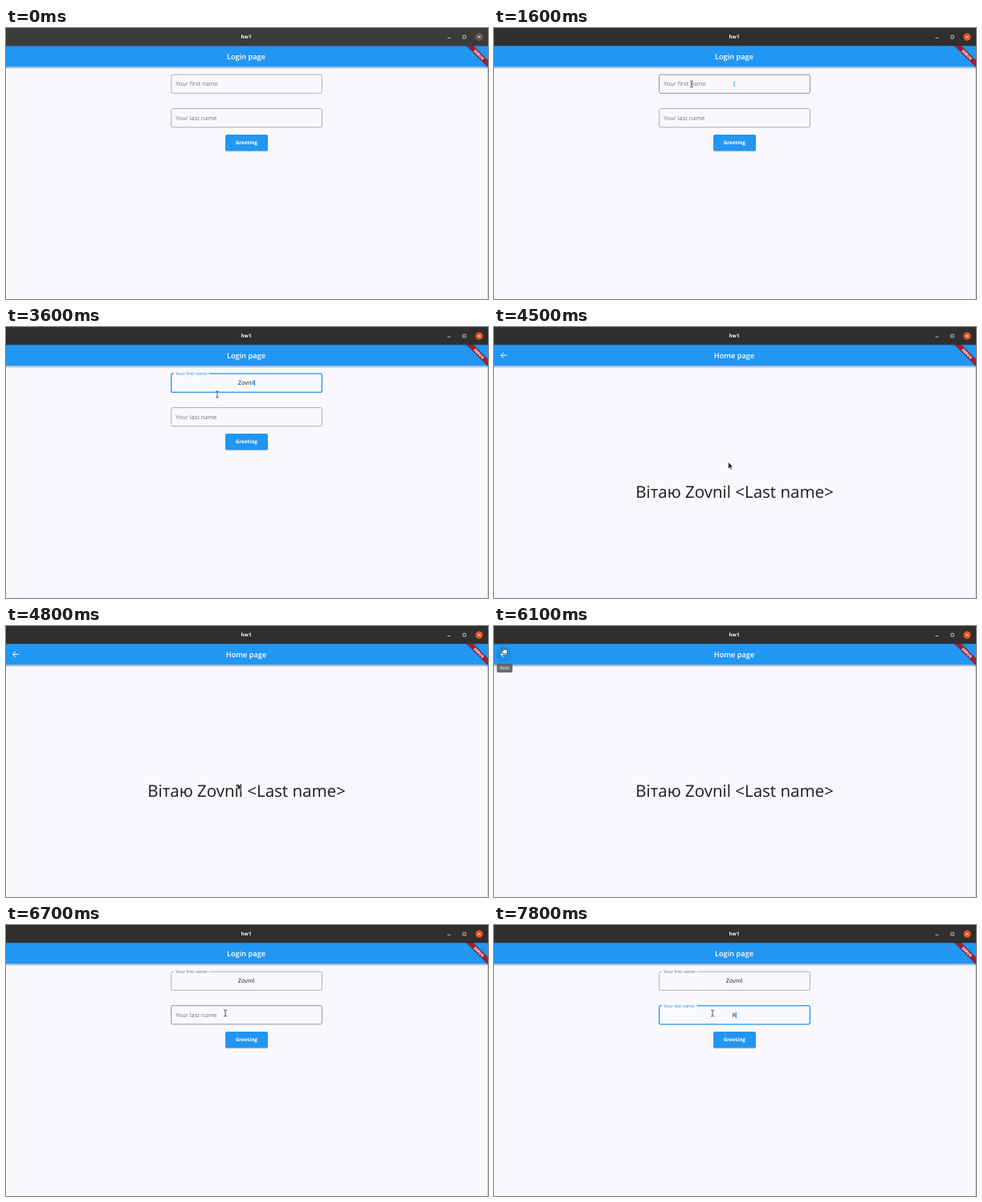
Write an HTML page that moves like this. It is 600 px wide and 338 px high and loops after 8 s.

```html
<!DOCTYPE html>
<html lang="en">
<head>
<meta charset="utf-8">
<title>Login page</title>
<style>
  html, body { margin: 0; width: 100%; height: 100%; overflow: hidden; background: #faf8fc; }
  svg { display: block; width: 600px; height: 338px; }
  text { font-family: "Open Sans", "Noto Sans", sans-serif; text-rendering: geometricPrecision; white-space: pre; }
  .mid { text-anchor: middle; }
  .bar { font-size: 9.2px; font-weight: 600; fill: #fff; }
  .typed { font-size: 7.4px; fill: #1d1b20; }
</style>
</head>
<body>
<svg viewBox="0 0 600 338">
  <defs>
    <linearGradient id="shade" x2="0" y2="1">
      <stop stop-color="#000" stop-opacity=".3"/>
      <stop offset="1" stop-color="#000" stop-opacity="0"/>
    </linearGradient>
    <clipPath id="app"><rect y="22" width="600" height="316"/></clipPath>
    <g id="page">
      <rect y="22" width="600" height="316" fill="#faf8fc"/>
      <rect y="48.5" width="600" height="3" fill="url(#shade)"/>
      <rect y="22" width="600" height="26.5" fill="#2196f3"/>
    </g>
  </defs>

  <g clip-path="url(#app)">
    <g id="login">
      <use href="#page"/>
      <text class="bar mid" x="299" y="39">Login page</text>
      <g id="fields"></g>
      <rect x="273" y="134" width="53" height="20.3" rx="2" fill="#000" opacity=".2"/>
      <rect x="273" y="133" width="53" height="20.3" rx="2" fill="#2196f3"/>
      <rect id="hover" x="273" y="133" width="53" height="20.3" rx="2" fill="#fff" opacity="0"/>
      <text class="mid" x="299.3" y="145.4" font-size="6.3" font-weight="700" fill="#fff">Greeting</text>
    </g>
    <rect id="scrim" y="22" width="600" height="316"/>
    <g id="home">
      <use href="#page"/>
      <text class="bar mid" x="299" y="39">Home page</text>
      <circle id="halo" cx="12" cy="35.4" r="9.4" fill="#000" opacity=".06"/>
      <path d="M15.6 35.4H8.8M12 32l-3.4 3.4 3.4 3.4" fill="none" stroke="#fff"/>
      <text id="hello" class="mid" x="299.5" y="213" font-size="20.5" fill="#1d1b20"></text>
    </g>
    <g id="tip">
      <rect x="3.5" y="47" width="19.5" height="11" rx="2" fill="#616161" opacity=".92"/>
      <text class="mid" x="13.2" y="54.4" font-size="5.3" fill="#fff">Back</text>
    </g>
    <g transform="translate(600 22) rotate(45)">
      <rect x="-20" y="12.6" width="40" height="7" fill="#000" opacity=".25"/>
      <rect x="-20" y="13.2" width="40" height="5.7" fill="#b0161f" opacity=".92"/>
      <text class="mid" y="17.7" font-size="4.5" font-weight="800" fill="#fff">DEBUG</text>
    </g>
    <path d="M599.7 49V338" stroke="#000" stroke-width=".6" opacity=".35"/>
  </g>

  <rect width="600" height="22.3" fill="#302f2e"/>
  <rect id="dim" width="600" height="22.3" fill="#3d3b3a"/>
  <text class="mid" x="299" y="13.4" font-size="6.2" font-weight="700" fill="#fff">hw1</text>
  <g id="controls" fill="none" stroke="#ddd" stroke-width=".8">
    <path d="M549.5 12.4h4M568.8 9.4h3.4v3.6h-3.4z"/>
    <circle cx="589" cy="11.2" r="4.6" fill="#e95420" stroke="none"/>
    <circle id="grey" cx="589" cy="11.2" r="4.6" fill="#5b5957" stroke="none"/>
    <path d="M587.4 9.6l3.2 3.2m0-3.2l-3.2 3.2" stroke="#fff"/>
  </g>

  <g id="cursor">
    <path id="arrow" d="M0 0v8.6l2-1.8 1.4 3 1.3-.6-1.3-2.9h2.7z" fill="#222" stroke="#fff" stroke-width=".6"/>
    <path id="beam" d="M-2-4q2 0 2 1v6q0 1-2 1M2-4q-2 0-2 1M2 4q-2 0-2-1" fill="none" stroke="#444" stroke-width=".9"/>
    <path id="hand" d="M-.7.6q.7-1.1 1.4 0v3l3 .6q1.2.4 1 1.7l-.6 3.4h-4.4l-2.6-3.6q.2-1.3 1.4-.5l.8.6z" fill="#fff" stroke="#222" stroke-width=".7"/>
  </g>
</svg>
<script>
const $ = id => document.getElementById(id);
const clamp = v => Math.max(0, Math.min(1, v));
const ramp = (t, start, len) => clamp((t - start) / len);
const mix = (a, b, k) => a + (b - a) * k;
const easeOut = k => 1 - (1 - k) ** 3;
const fade = (el, v) => el.setAttribute("opacity", v);
const zoom = (el, s) => el.setAttribute("transform", `translate(300 180) scale(${s}) translate(-300 -180)`);

const NAME = "Zovnil";
const BLUE = "#2196f3";
const OPEN = 4100, BACK = 6200, NAV = 300;
$("hello").textContent = `Вітаю ${NAME} <Last name>`;

// Cursor stops: time, x, y
const stops = [
  [200, 306, 318], [500, 296, 262], [1000, 250, 137], [1300, 246, 70], [3500, 246, 70],
  [3600, 263, 84], [3800, 294, 150], [4300, 294, 150], [4800, 288, 196], [5000, 288, 196],
  [5500, 278, 182], [5600, 278, 182], [6000, 12, 25.5], [6500, 12, 25.5], [6700, 273, 110],
  [7000, 275, 113], [7400, 272, 110]
];

function pointer(t) {
  const i = stops.findIndex(s => s[0] > t);
  if (i < 0) return stops.at(-1).slice(1);
  const a = stops[Math.max(0, i - 1)], b = stops[i], k = ramp(t, a[0], b[0] - a[0]);
  return [mix(a[1], b[1], k), mix(a[2], b[2], k)];
}

const within = (x, y, x0, y0, x1, y1) => x >= x0 && x <= x1 && y >= y0 && y <= y1;

function makeField(y, label, focus, blur, word, times) {
  const g = document.createElementNS("http://www.w3.org/2000/svg", "g");
  g.innerHTML = `<rect x="205.7" y="${y}" width="187.6" height="23.2" rx="2" fill="none"/>
    <rect x="209" y="${y - 1.5}" height="3" fill="#faf8fc"/>
    <text x="211">${label}</text>
    <text class="typed mid" x="299" y="${y + 14}"></text>
    <rect y="${y + 8}" width=".9" height="7.6" fill="${BLUE}"/>`;
  $("fields").append(g);
  const [box, gap, tag, text, caret] = g.children;

  return (t, mx, my) => {
    const lift = ramp(t, focus, 100), active = t >= focus && t < blur;
    const lit = active && lift > 0, hot = within(mx, my, 205, y, 394, y + 24);
    box.setAttribute("stroke", lit ? BLUE : hot ? "#75727a" : "#99969d");
    box.setAttribute("stroke-width", lit ? 1.3 : .75);
    gap.setAttribute("width", 43.5 * lift);
    tag.setAttribute("y", mix(y + 14, y + 2.1, lift));
    tag.setAttribute("font-size", mix(7.4, 5.5, lift));
    tag.setAttribute("fill", lit ? BLUE : "#7a777e");
    const typed = word.slice(0, times.filter(s => t >= s).length);
    if (text.textContent !== typed) text.textContent = typed;
    caret.setAttribute("x", 298.6 + (typed ? text.getComputedTextLength() / 2 + .3 : 0));
    fade(caret, active ? 1 : 0);
  };
}

const fields = [
  makeField(58.2, "Your first name", 1600, OPEN, NAME, [1900, 2500, 2600, 2700, 2900, 3100]),
  makeField(100.6, "Your last name", 7500, 8000, "R", [7800])
];

function draw(t) {
  const [x, y] = pointer(t);
  const unfocused = 1 - ramp(t, 100, 200);
  fade($("dim"), unfocused);
  fade($("grey"), unfocused);
  fields.forEach(f => f(t, x, y));

  // Zoom page transitions
  const go = ramp(t, OPEN, NAV), back = ramp(t, BACK, NAV), returning = t >= BACK;
  zoom($("login"), returning ? mix(1.1, 1, easeOut(back)) : mix(1, 1.05, easeOut(go)));
  zoom($("home"), returning ? mix(1, .9, easeOut(back)) : mix(.85, 1, easeOut(go)));
  fade($("home"), returning ? 1 - ramp(back, .08, .125) : ramp(go, .125, .125));
  fade($("scrim"), returning ? 0 : .6 * ramp(go, .2, .2));

  const onHome = t > OPEN + 100 && t <= BACK;
  const onBack = onHome && within(x, y, 2, 24, 23, 47);
  const onButton = !onHome && within(x, y, 273, 133, 326, 154);
  const onField = !onHome && x > 205 && x < 394 && (y > 58 && y < 86 || y > 100 && y < 124);
  fade($("hover"), onButton ? .08 : 0);
  fade($("halo"), onBack ? .06 : 0);
  fade($("tip"), onBack && t >= 6000 ? 1 : 0);

  const kind = onBack || onButton ? "hand" : onField ? "beam" : "arrow";
  for (const id of ["arrow", "beam", "hand"]) fade($(id), id === kind ? 1 : 0);
  $("cursor").setAttribute("transform", `translate(${x} ${y})`);
  fade($("cursor"), t >= 200 ? 1 : 0);
}

function tick(now) {
  draw(Math.floor(now % 8000 / 100) * 100);
  requestAnimationFrame(tick);
}
draw(0);
requestAnimationFrame(tick);
</script>
</body>
</html>
```
